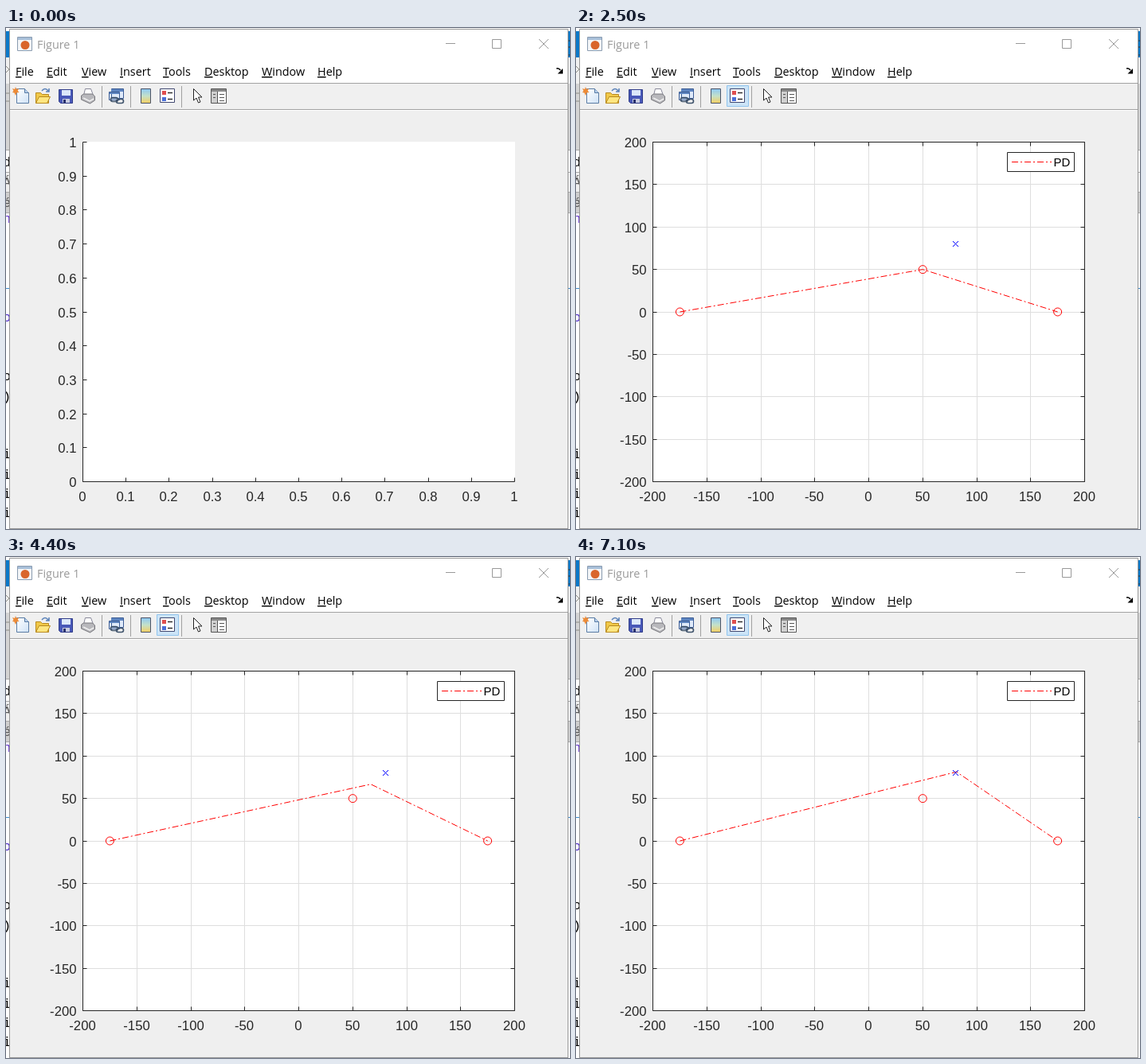
These frames come from a looping animation (708 by 630 pixels, 7.2 s). An HTML page:

```html
<!DOCTYPE html>
<html>
<head>
<meta charset="utf-8">
<style>
  html, body { margin: 0; width: 100%; height: 100%; overflow: hidden; background: #fff; }
  svg { display: block; }
  .ui { font: 14.4px "Open Sans", sans-serif; }
  .ui tspan { text-decoration: underline; }
  .code { font: 17px "Liberation Mono", monospace; }
  .axis { font: 16.7px "Liberation Sans", sans-serif; fill: #262626; }
  .ink { stroke: #262626; fill: none; }
  .grid { stroke: #dedede; fill: none; }
  .red { stroke: #f00; fill: none; }
  .dashdot { stroke-dasharray: 8 3 2 3; }
</style>
</head>
<body>
<svg width="708" height="630" viewBox="0 0 708 630">
  <defs>
    <linearGradient id="bar" x2="0" y2="1">
      <stop stop-color="#8cc8f4"/><stop offset=".5" stop-color="#c4e0c8"/><stop offset="1" stop-color="#f6d060"/>
    </linearGradient>
    <linearGradient id="sheet" x2="1" y2="1">
      <stop stop-color="#fff"/><stop offset="1" stop-color="#cfe2f6"/>
    </linearGradient>
  </defs>

  <!-- editor behind the window -->
  <rect width="708" height="630" fill="#fff"/>
  <path d="M0 4h708v33H0z" fill="#0a78c8"/>
  <path d="M0 37h708v33H0z" fill="#f0f0f0"/>
  <path d="M0 70h708v83H0z" fill="#d4d4d4"/>
  <path d="M0 181h708v26H0z" fill="#f0f0f0"/>
  <path d="M0 207h708v26H0z" fill="#cfcfcf"/>
  <path d="M0 153.5h708M0 181.5h708M0 206.5h708M0 232.5h708" stroke="#a8a8a8"/>
  <path d="M0 327.5h708" stroke="#3c8cd0"/>
  <path d="M0 48l4 4-4 4M0 82h4M0 92h4" fill="none" stroke="#8c8c84"/>
  <path d="M706 16h2M706 24h2M706 34h2" stroke="#333"/>
  <g id="behind"></g>

  <!-- window frame -->
  <path d="M5 2h700v628H5z" fill="#efefef"/>
  <path d="M5 2h700v67H5z" fill="#fff"/>
  <path d="M5 70h700v32H5z" fill="#f0f0f0"/>
  <path d="M5 69.5h700M5 102.5h700" stroke="#a2a2a2"/>
  <path d="M5 103.5h700" stroke="#fff"/>
  <path d="M4.500 630V1.500h701V630M4 629.500h702" fill="none" stroke="#979797"/>

  <!-- title bar -->
  <path d="M14.500 11.500h18v17h-18z" fill="#f4f6f8" stroke="#8a9cb0"/>
  <path d="M15 12h17v3H15z" fill="#a8bfd8"/>
  <circle cx="24" cy="21.500" r="5.500" fill="#d9652b"/>
  <text class="ui" x="39" y="26" fill="#999">Figure 1</text>
  <path d="M552 19.500h12M610.500 14.500h11v11h-11zM669 14l12 12M681 14l-12 12" fill="none" stroke="#999"/>
  <g id="menu" class="ui"></g>
  <path d="M691 51q3-1 5 2" fill="none" stroke="#000" stroke-width="1.500"/>
  <path d="M699 51v6.500h-6.500z"/>

  <!-- toolbar -->
  <path d="M120.500 73v27M156.500 73v27M220.500 73v27" stroke="#a0a0a0"/>
  <path id="pressed" d="M189.500 72.500h27v26h-27z" fill="#cce4f7" stroke="#90c4ee"/>
  <g stroke="#5a7ca4">
    <path d="M13.500 76.500h10l5 5v13h-15z" fill="url(#sheet)"/>
    <path d="M23.500 76.500v5h5" fill="#b8d0ec"/>
  </g>
  <path d="M12 74l1.200 3 3-1-1.500 3 2 2-3 .300L12 85l-1.500-3.500-2.500-.500 1.500-2L8 76l3 1z" fill="#ec8b38"/>
  <g stroke="#b88a20">
    <path d="M37.500 94.500v-13h6l2 2h8v11z" fill="#f0c848"/>
    <path d="M37.500 94.500l4-8h14l-4 8z" fill="#ffe680"/>
  </g>
  <path d="M45 79q4-5 8 0M54 76v4h-4" fill="none" stroke="#5880b8" stroke-width="1.500"/>
  <path d="M66.500 77.500h17v17h-15l-2-2z" fill="#4858b8" stroke="#303c88"/>
  <path d="M70 78h11v7H70z" fill="#dce8fa"/>
  <path d="M71 89h9v5h-9z" fill="#c8cce0"/>
  <path d="M72 90h3v4h-3z" fill="#28306c"/>
  <path d="M97.500 84.500l2-8h7l3 8z" fill="#fff" stroke="#889"/>
  <path d="M94.500 85l3-2h11l3 3v5l-6 4-11-5z" fill="#b8b8bc" stroke="#77777c"/>
  <path d="M97 88l8 4 5-3" fill="none" stroke="#f0f0f0" stroke-width="1.500"/>
  <path d="M132.500 76.500h15v12h-15zM129.500 80.500h13v10h-13z" fill="#dfeafa" stroke="#3c5c94"/>
  <path d="M132 77h15v3h-15zM130 81h12v2h-12z" fill="#5c84c0"/>
  <path d="M134 92.500a2.500 2.500 0 0 1 0-5h4a2.500 2.500 0 0 1 0 5zM141 94.500a2.500 2.500 0 0 1 0-5h4a2.500 2.500 0 0 1 0 5z" fill="none" stroke="#40546c" stroke-width="1.600"/>
  <path d="M169.500 76.500h12v18h-12z" fill="url(#bar)" stroke="#4c5468"/>
  <path d="M193.500 76.500h18v17h-18z" fill="#fff" stroke="#404870"/>
  <path d="M196 79h5v5h-5z" fill="#e05050"/>
  <path d="M196 87h5v5h-5z" fill="#4c70d8"/>
  <path d="M203 81.500h6M203 89.500h6" stroke="#303030" stroke-width="1.500"/>
  <path d="M235.500 76.500v14.500l3.500-3 2.500 6 2.500-1-2.500-6h4.500z" fill="#fff" stroke="#222"/>
  <path d="M257.500 76.500h19v18h-19z" fill="#fff" stroke="#555"/>
  <path d="M258 77h18v3h-18z" fill="#888"/>
  <path d="M258 80h7v14h-7z" fill="#d0d0d0"/>
  <path d="M265.500 80v14M268 83.500h6M268 87.500h6M268 91.500h6M260 83.500h3M260 87.500h3" stroke="#555"/>

  <!-- axes -->
  <path d="M96 143h543v428H96z" fill="#fff"/>
  <g id="blank"></g>
  <g id="plot">
    <g id="scale"></g>
    <path id="arm" class="red dashdot"/>
    <g id="rings" class="red"></g>
    <path d="M473 268l7 7M480 268l-7 7" stroke="#00f"/>
    <path d="M541.500 156.500h84v24h-84z" fill="#fff" stroke="#262626"/>
    <path class="red dashdot" d="M547 168.500h50"/>
    <text x="599.500" y="174" style="font:15px 'Liberation Sans',sans-serif">PD</text>
  </g>
</svg>
<script>
const $ = id => document.getElementById(id);
const L = 96.5, R = 638.5, T = 143.5, B = 570.5;
const px = v => L + (R - L) * (v + 200) / 400;
const py = v => B - (B - T) * (v + 200) / 400;

$('behind').innerHTML = [
  ['d', 174, '#000'], ['Á', 199, '#555'], ['é', 225, '#555'], ['n', 245, '#5a28c8'],
  ['o', 369, '#4a28c8'], ['o', 443, '#000'], [')', 469, '#000'],
  ...[541, 567, 591, 615].map(y => ['i', y, '#000'])
].map(([s, y, c]) => `<text class="code" x="-4" y="${y}" fill="${c}">${s}</text>`).join('');

$('menu').innerHTML = Object.entries({
  File: 12, Edit: 51, View: 95, Insert: 143, Tools: 197, Desktop: 249, Window: 321, Help: 391
}).map(([s, x]) => `<text x="${x}" y="60"><tspan>${s[0]}</tspan>${s.slice(1)}</text>`).join('');

// Ticks and labels for n intervals; a boxed scale also gets a grid and ticks on all sides.
function axes(n, label, boxed) {
  let ticks = '', grid = '', text = '';
  for (let i = 0; i <= n; i++) {
    const x = Math.floor(L + (R - L) * i / n) + .5;
    const y = Math.floor(B - (B - T) * i / n) + .5;
    ticks += `M${x} ${B}v-5M${L} ${y}h5`;
    if (boxed) {
      ticks += `M${x} ${T}v5M${R} ${y}h-5`;
      grid += `M${x} ${T}V${B}M${L} ${y}H${R}`;
    }
    text += `<text x="${x - .5}" y="595" text-anchor="middle">${label(i)}</text>` +
            `<text x="88.5" y="${y + 6.5}" text-anchor="end">${label(i)}</text>`;
  }
  const frame = `M${L} ${T}V${B}H${R}` + (boxed ? `V${T}H${L}` : '');
  return `<path class="grid" d="${grid}"/><path class="ink" d="${frame}${ticks}"/><g class="axis">${text}</g>`;
}
$('blank').innerHTML = axes(10, i => i / 10, false);
$('scale').innerHTML = axes(8, i => i * 50 - 200, true);
$('rings').innerHTML = [[-175, 0], [50, 50], [175, 0]]
  .map(([x, y]) => `<circle cx="${px(x)}" cy="${py(y)}" r="5"/>`).join('');

// Joint position along the diagonal: [seconds, value, speed], joined by cubic curves.
const keys = [[2.6, 50, 0], [3.6, 58.7, 10.8], [5.2, 73.3, 7], [6, 77.8, 4.4], [7.1, 81.3, 1.8]];
function joint(t) {
  if (t <= keys[0][0]) return keys[0][1];
  let i = 0;
  while (i < keys.length - 2 && t > keys[i + 1][0]) i++;
  const [t0, a, va] = keys[i], [t1, b, vb] = keys[i + 1];
  const h = t1 - t0, u = Math.min((t - t0) / h, 1), w = 1 - u;
  return w * w * ((1 + 2 * u) * a + u * h * va) + u * u * ((3 - 2 * u) * b - w * h * vb);
}

function draw() {
  let step = Math.floor(performance.now() % 7200 / 100);
  if (step === 28) step = 27; // the plot pauses here for one step
  const on = step >= 19;
  $('plot').style.display = $('pressed').style.display = on ? '' : 'none';
  $('blank').style.display = on ? 'none' : '';
  // keep the toolbar button visible above its highlight
  const p = joint(step / 10);
  $('arm').setAttribute('d', `M${px(-175)} ${py(0)}L${px(p)} ${py(p)}L${px(175)} ${py(0)}`);
  requestAnimationFrame(draw);
}
draw();
</script>
</body>
</html>
```
